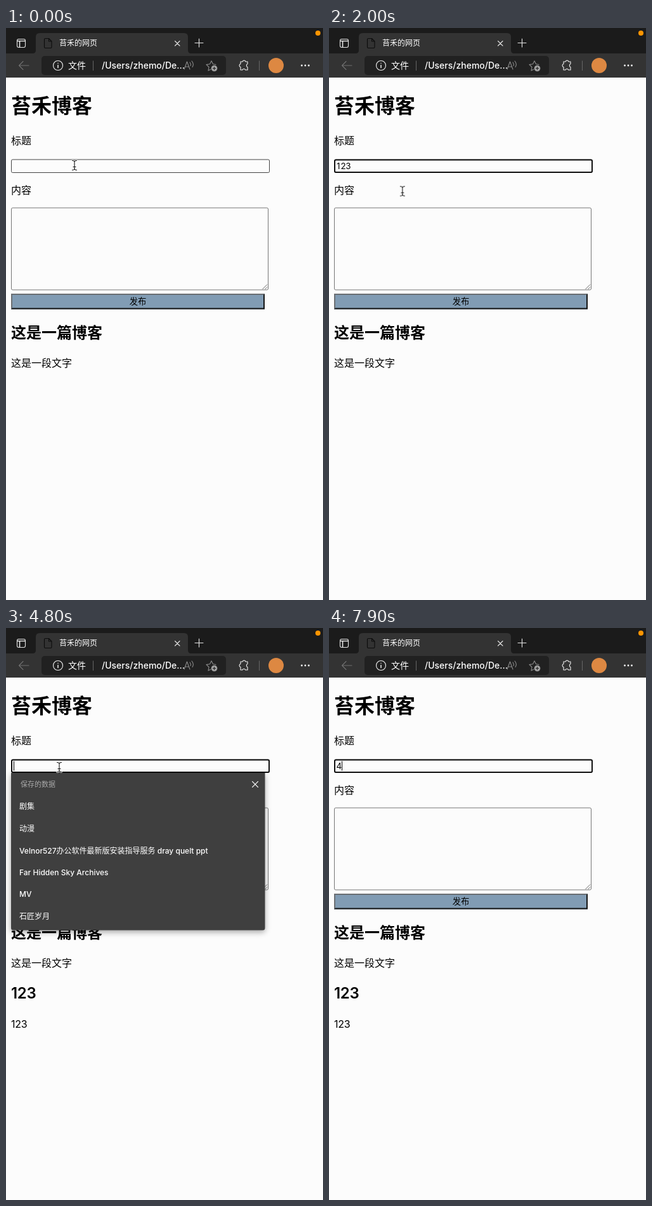
An HTML page that plays this animation: 500 px wide and 900 px high, repeating every 8 s.

```html
<!DOCTYPE html>
<html lang="zh-CN">
<head>
<meta charset="utf-8">
<title>苔禾的网页</title>
<style>
html, body { margin: 0; width: 100%; height: 100%; overflow: hidden; background: #fcfcfc; }
svg { display: block; width: 500px; height: 900px; }
text { font-family: Inter, "Noto Sans CJK SC", "Noto Sans CJK", sans-serif; font-size: 16px; white-space: pre; }
.bold { font-weight: 700; }
.line { fill: none; stroke-width: 1.1; stroke-linecap: round; stroke-linejoin: round; }
.field { fill: #fcfcfc; stroke: #767676; }
.ring { fill: none; stroke: #101010; stroke-width: 2; }
.small { font-size: 13.33px; }
.mono { font-family: "DejaVu Sans Mono", monospace; font-size: 13px; }
.item { font-size: 12px; font-weight: 500; fill: #fff; }
#popup { filter: drop-shadow(0 3px 5px rgba(0, 0, 0, .35)); }

/* One loop is 8 s, so 1.25% is 100 ms */
.anim { animation: 8s step-end infinite; }
#popup { animation-name: popup; }
#titleBox { animation-name: hover; }
#titleRing { animation-name: titleRing; }
#areaRing { animation-name: areaRing; }
#titleCaret { animation-name: titleBlink, titleStep; }
#areaCaret { animation-name: areaBlink, areaStep; }
#t1 { animation-name: t1; } #t2 { animation-name: t2; }
#t3 { animation-name: t3; } #t4 { animation-name: t4; }
#a1 { animation-name: a1; } #a2 { animation-name: a2; } #a3 { animation-name: a3; }
#post { animation-name: post; }
#beam { animation-name: beam; }
#arrow { animation-name: arrow; }
#pointer { animation: move 8s linear infinite; }

@keyframes popup { 0%, 12.5%, 95%, 100% { opacity: 0 } 6.25%, 58.75% { opacity: 1 } }
@keyframes hover { 0% { stroke: #444 } 5%, 100% { stroke: #767676 } }
@keyframes titleRing { 0%, 30% { opacity: 0 } 5%, 57.5%, 100% { opacity: 1 } }
@keyframes areaRing { 0%, 46.25%, 100% { opacity: 0 } 30% { opacity: 1 } }
@keyframes titleBlink {
  0%, 11.25%, 25%, 65%, 77.5%, 90% { opacity: 0 }
  5%, 12.5%, 58.75%, 71.25%, 83.75%, 95%, 100% { opacity: 1 }
}
@keyframes titleStep {
  0%, 47.5% { transform: none }
  12.5% { transform: translateX(7px) }
  16.25% { transform: translateX(14.5px) }
  18.75% { transform: translateX(22px) }
  95%, 100% { transform: translateX(7.5px) }
}
@keyframes areaBlink { 0%, 41.25%, 100% { opacity: 0 } 30% { opacity: 1 } }
@keyframes areaStep {
  0%, 100% { transform: none }
  31.25% { transform: translateX(8px) }
  32.5% { transform: translateX(16px) }
  35% { transform: translateX(23.5px) }
}
@keyframes t1 { 0%, 47.5%, 100% { opacity: 0 } 12.5% { opacity: 1 } }
@keyframes t2 { 0%, 47.5%, 100% { opacity: 0 } 16.25% { opacity: 1 } }
@keyframes t3 { 0%, 47.5%, 100% { opacity: 0 } 18.75% { opacity: 1 } }
@keyframes t4 { 0% { opacity: 0 } 95%, 100% { opacity: 1 } }
@keyframes a1 { 0%, 47.5%, 100% { opacity: 0 } 31.25% { opacity: 1 } }
@keyframes a2 { 0%, 47.5%, 100% { opacity: 0 } 32.5% { opacity: 1 } }
@keyframes a3 { 0%, 47.5%, 100% { opacity: 0 } 35% { opacity: 1 } }
@keyframes post { 0% { opacity: 0 } 47.5%, 100% { opacity: 1 } }
@keyframes beam {
  0%, 23.75%, 36.25%, 53% { opacity: 1 }
  12.5%, 31.25%, 42.5%, 95%, 100% { opacity: 0 }
}
@keyframes arrow { 0%, 53%, 100% { opacity: 0 } 42.5% { opacity: 1 } }
@keyframes move {
  0%, 1.25% { transform: translate(108px, 216px) }
  5%, 23.75% { transform: translate(106px, 217px) }
  28.75%, 37.5% { transform: translate(145px, 374px) }
  45% { transform: translate(196px, 436px) }
  47.5%, 52.5% { transform: translate(192px, 430px) }
  57.5%, 100% { transform: translate(84px, 219px) }
}
</style>
</head>
<body>
<svg viewBox="0 0 500 900">
  <rect width="500" height="900" fill="#fcfcfc"/>

  <!-- Browser frame -->
  <rect width="500" height="41" fill="#1b1b1b"/>
  <rect y="40" width="500" height="38" fill="#333"/>
  <path d="M42 40Q47 40 47 35V14Q47 8 53 8H281Q287 8 287 14V35Q287 40 292 40Z" fill="#333"/>
  <rect x="56" y="44" width="291" height="30" rx="5" fill="#212121"/>
  <circle cx="492" cy="8" r="4" fill="#ff9500"/>
  <g class="line" stroke="#e4e4e4">
    <rect x="17.5" y="17.5" width="13" height="13" rx="2.5"/>
    <path d="M18 20.5H30M21.5 21V30" stroke-width="1.6"/>
    <path d="M266.500 20.500l7.500 7.500M274 20.500l-7.500 7.500"/>
    <path d="M298 23.500H311M304.500 17V30"/>
  </g>
  <path class="line" stroke="#0c0c0c" stroke-width="1.3" d="M62 16.500H67.500L72 21V30Q72 31.500 70.500 31.500H62Q60.500 31.500 60.500 30V18Q60.500 16.500 62 16.500ZM67.500 16.500V21H72"/>
  <text x="84" y="28" fill="#fff" font-weight="500" style="font-size:12px">苔禾的网页</text>

  <path class="line" stroke="#707070" d="M36 59H20.500M27 52.500L20.500 59L27 65.500"/>
  <g class="line" stroke="#f0f0f0">
    <circle cx="82" cy="59" r="7.500"/>
    <path d="M82 58.500V62.500M82 55.500V55.600" stroke-width="1.5"/>
  </g>
  <g fill="#fff" font-weight="500">
    <text x="98" y="64" style="font-size:14px">文件</text>
    <text x="151" y="64" style="font-size:14px">/Users/zhemo/De...</text>
  </g>
  <path d="M137.500 51.500V67M399.500 51.500V67" stroke="#666"/>
  <g class="line" stroke="#8c8c8c">
    <path d="M281 65L285.500 53L290 65M282.700 61H288.500M290 54Q292 56.500 291 59.500M293 52Q297 56.500 294 61.500"/>
    <path d="M331 57.500L326.500 56.800L324 51.800L321.500 56.800L316 57.600L320 61.500L319 67L323 65"/>
  </g>
  <circle cx="328.500" cy="63.500" r="4.800" fill="#a0a0a0"/>
  <path d="M326 63.500H331M328.500 61V66" stroke="#212121"/>
  <path class="line" stroke="#f0f0f0" stroke-width="1.3" d="M370 53H373.200Q373.500 51 375.500 51T377.800 53H381V56.500Q379.300 57 379.300 59T381 61.500V66H377.500Q377 64.300 375.300 64.300T373 66H370V61.500Q368 61 368 59T370 56.500Z"/>
  <circle cx="426" cy="59" r="12" fill="#dd8842"/>
  <g fill="#f4f4f4"><circle cx="466.500" cy="59" r="1.400"/><circle cx="472" cy="59" r="1.400"/><circle cx="477.500" cy="59" r="1.400"/></g>

  <!-- Page -->
  <text class="bold" x="8" y="134" style="font-size:32px">苔禾博客</text>
  <text x="8" y="183">标题</text>
  <rect id="titleBox" class="field anim" x="8.500" y="207" width="407" height="20.500" rx="2"/>
  <rect id="titleRing" class="ring anim" x="9" y="207.500" width="406" height="19.500" rx="2"/>
  <text x="8" y="261">内容</text>
  <rect class="field" x="8.500" y="283" width="405" height="129" rx="2"/>
  <path d="M404.500 411L412 403.500M408.500 411L412 407.500" stroke="#666"/>
  <rect id="areaRing" class="ring anim" x="9" y="283.500" width="404" height="128" rx="2"/>

  <g class="small">
    <text id="t1" class="small anim" x="12" y="221.500">1</text>
    <text id="t2" class="small anim" x="18.500" y="221.500">2</text>
    <text id="t3" class="small anim" x="26.300" y="221.500">3</text>
    <text id="t4" class="small anim" x="11.500" y="221.500">4</text>
  </g>
  <text id="a1" class="mono anim" x="11.500" y="298">1</text>
  <text id="a2" class="mono anim" x="19.300" y="298">2</text>
  <text id="a3" class="mono anim" x="27.100" y="298">3</text>
  <rect id="titleCaret" class="anim" x="12" y="209.500" width="1" height="15"/>
  <rect id="areaCaret" class="anim" x="11.500" y="286" width="1" height="15"/>

  <rect x="8" y="418" width="400" height="24.500" fill="#819cb4"/>
  <path d="M8 442.500V418H408L406 420H10V440.500Z" fill="#6b6f73"/>
  <path d="M8 442.500H408V418L406 420V440.500H10Z" fill="#151515"/>
  <text class="small" x="194.700" y="435">发布</text>

  <text class="bold" x="8" y="488" style="font-size:24px">这是一篇博客</text>
  <text x="8" y="533">这是一段文字</text>
  <g id="post" class="anim">
    <text x="8" y="583" font-weight="600" style="font-size:24px;letter-spacing:-.3px">123</text>
    <text x="8" y="628.500" style="letter-spacing:-.2px">123</text>
  </g>

  <!-- Saved entries -->
  <g id="popup" class="anim">
    <path d="M8 228H408.500V472Q408.500 475.500 405 475.500H11.500Q8 475.500 8 472Z" fill="#3f3f3f"/>
    <text x="23" y="250" fill="#aaa" style="font-size:11px">保存的数据</text>
    <path class="line" stroke="#f0f0f0" d="M388.500 241.500l9 9M397.500 241.500l-9 9"/>
    <text class="item" x="21" y="285">剧集</text>
    <text class="item" x="21" y="320">动漫</text>
    <text class="item" x="21" y="355">Velnor527办公软件最新版安装指导服务 dray quelt ppt</text>
    <text class="item" x="21" y="389">Far Hidden Sky Archives</text>
    <text class="item" x="21" y="423">MV</text>
    <text class="item" x="21" y="458">石匠岁月</text>
  </g>

  <g id="pointer">
    <g id="beam" class="anim line">
      <path id="beamShape" d="M-3.500 -7.500Q0 -7.500 0 -5Q0 -7.500 3.500 -7.500M0 -5V5M-3.500 7.500Q0 7.500 0 5Q0 7.500 3.500 7.500M-2 2.500H2" stroke="#fff" stroke-width="2.600"/>
      <path d="M-3.500 -7.500Q0 -7.500 0 -5Q0 -7.500 3.500 -7.500M0 -5V5M-3.500 7.500Q0 7.500 0 5Q0 7.500 3.500 7.500M-2 2.500H2" stroke="#111"/>
    </g>
    <path id="arrow" class="anim" d="M0 0V14.500L3.400 11.400L5.600 16.200L8 15.200L5.800 10.500H10.300Z" stroke="#fff"/>
  </g>
</svg>
</body>
</html>
```
